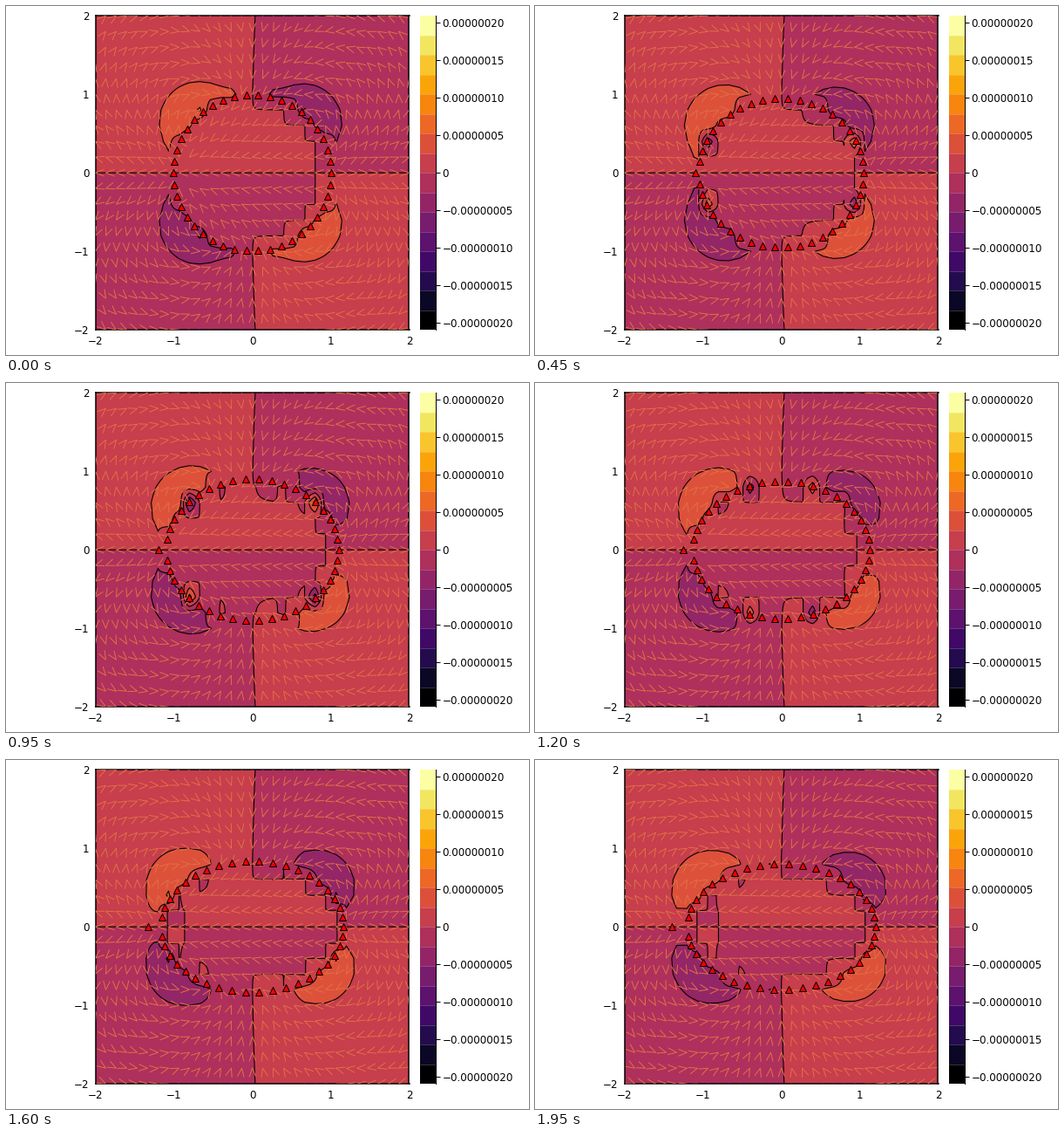
Animation, 600 px wide and 400 px high, one loop 2000 ms. Source, as a matplotlib script:

```python
import numpy as np
import matplotlib.pyplot as plt
from matplotlib.animation import FuncAnimation
from matplotlib.collections import LineCollection

W, H, DPI = 600, 400, 100
PX = 72 / DPI
FRAMES, INTERVAL = 40, 50
plt.rcParams["font.family"] = "DejaVu Sans"
plt.rcParams["font.size"] = 8.6

# Ring of point forces
N = 42
theta = 2 * np.pi * np.arange(N) / N
weight = np.where(np.arange(N) == N // 2, 2.0, 1.0)
force = weight * np.exp(-1j * theta)

# Coarse sampling grid, refined bilinearly for the contours
NX, NY, FINE = 31, 21, 8
gx, gy = np.linspace(-2, 2, NX), np.linspace(-2, 2, NY)
grid = gx[None, :] + 1j * gy[:, None]
STEP = 21.06
levels = STEP * np.arange(-8, 9)
colors = plt.get_cmap("inferno")(np.linspace(0, 1, 16))
fills = [colors[0], *colors, colors[-1]]


def refine_matrix(n):
    t = np.linspace(0, n - 1, (n - 1) * FINE + 1)
    return np.maximum(0, 1 - np.abs(t[:, None] - np.arange(n)))


RX, RY = refine_matrix(NX), refine_matrix(NY)
fx = np.linspace(-2, 2, len(RX))
fy = np.linspace(-2, 2, len(RY))


def ring(n):
    s = 0.005 * n
    x = np.cos(theta) * (1 + s * weight)
    y = np.sin(theta) * (1 - s)
    return x + 1j * y


def flow(points):
    """Rotation and radial velocity induced by the forces on the grid."""
    r = grid[..., None] - points
    r2 = np.abs(r) ** 2 + 1e-9
    fr = np.conj(force) * r
    rotation = -(fr.imag / r2).sum(-1)
    velocity = (fr.real * r / r2).sum(-1)
    return rotation, velocity


def chevrons(velocity, length=10.8, half=np.radians(21)):
    """Open arrow heads with the tip on each grid point."""
    back = -length / 90 * np.exp(1j * np.angle(velocity.ravel()))
    tip = grid.ravel()
    arms = np.stack([tip + back * np.exp(1j * half), tip,
                     tip + back * np.exp(-1j * half)], axis=1)
    return np.stack([arms.real, arms.imag], axis=-1)


def pixel_axes(x, y, w, h):
    return fig.add_axes([x / W, 1 - (y + h) / H, w / W, h / H])


fig = plt.figure(figsize=(W / DPI, H / DPI), dpi=DPI, facecolor="white")

ax = pixel_axes(102.5, 11.2, 360, 360)
ax.set(xlim=(-2, 2), ylim=(-2, 2))
ticks = range(-2, 3)
names = [str(t).replace("-", "\u2212") for t in ticks]
ax.set_xticks(ticks, names)
ax.set_yticks(ticks, names)
ax.tick_params(length=0, pad=5.0)
for spine in ax.spines.values():
    spine.set_linewidth(1.5 * PX)

# Colour bar
bar = pixel_axes(474.5, 11.2, 18, 360)
bar.imshow(colors[:, None, :], origin="lower", aspect="auto",
           extent=(0, 1, -2.09, 2.09), interpolation="nearest")
bar.hlines(np.linspace(-2.09, 2.09, 17)[1:-1], 0, 1, colors="white",
           linewidths=PX, alpha=0.2)
marks = np.arange(-4, 5) * 0.5
bar.set_xticks([])
bar.set_yticks(marks, [f"{m * 1e-7:.8f}".replace("-", "\u2212") if m else "0"
                       for m in marks])
bar.yaxis.tick_right()
bar.tick_params(length=5 * PX, width=PX, pad=2.3)
for side, spine in bar.spines.items():
    spine.set_visible(side == "right")
    spine.set_linewidth(PX)

arrows = LineCollection([], colors="#E26F46", linewidths=PX, zorder=3)
ax.add_collection(arrows)
dots, = ax.plot([], [], ls="", marker="^", ms=8.4 * PX, mfc="red",
                mec="black", mew=PX, zorder=4)
contours = []


def draw(i):
    while contours:
        contours.pop().remove()
    points = ring(i + 1)
    rotation, velocity = flow(points)
    z = RY @ rotation @ RX.T
    contours.append(ax.contourf(fx, fy, z, levels, colors=fills,
                                extend="both", zorder=1))
    contours.append(ax.contour(fx, fy, z, levels, colors="black",
                               linewidths=PX * 1.1, linestyles="solid",
                               zorder=2))
    arrows.set_segments(chevrons(velocity))
    dots.set_data(points.real, points.imag)
    return [arrows, dots]


def start():
    return draw(0)


anim = FuncAnimation(fig, draw, frames=FRAMES, init_func=start,
                     interval=INTERVAL, repeat=True, repeat_delay=0)
plt.show()
```
